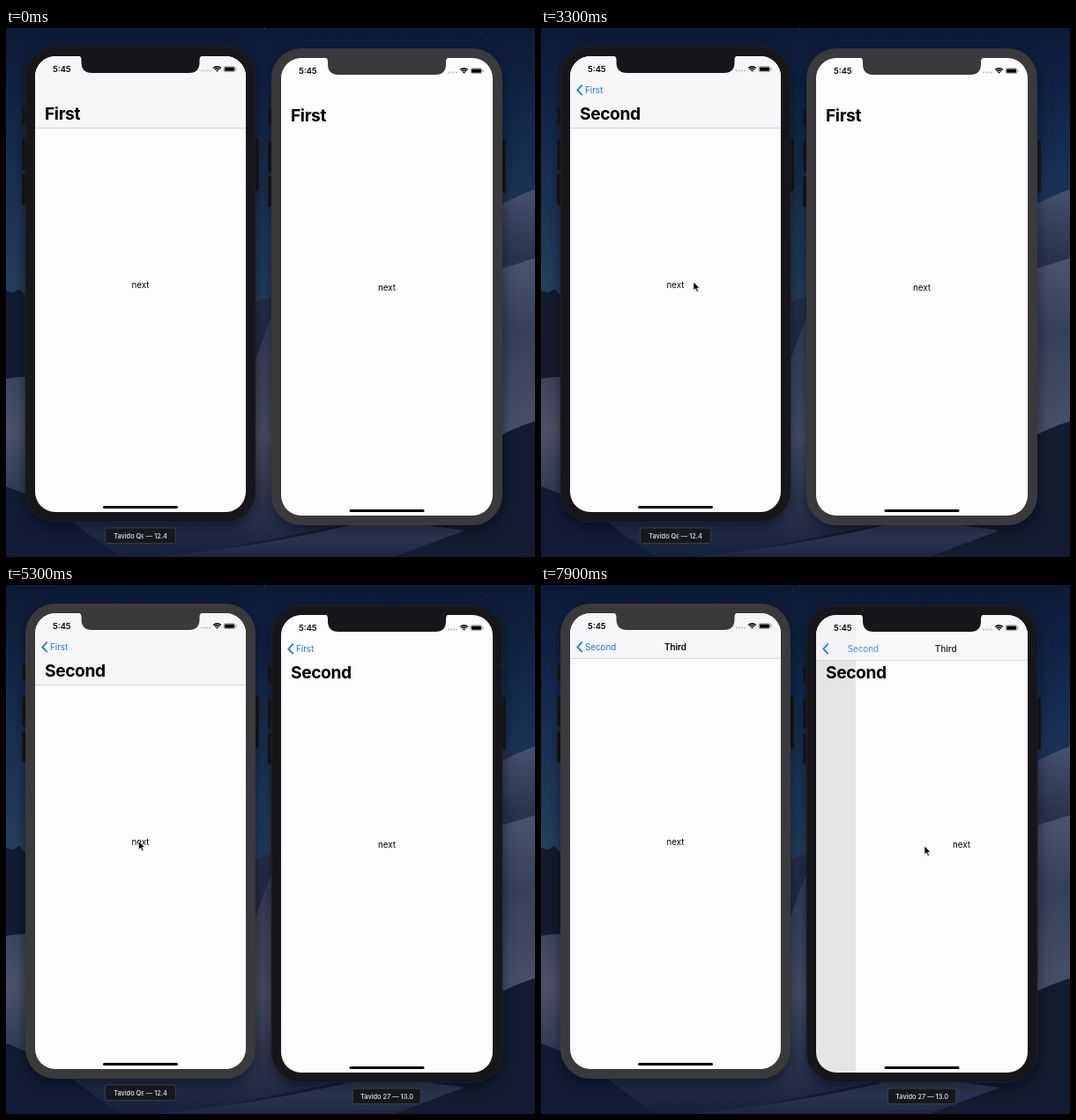
Write an HTML page that moves like this. It is 600 px wide and 600 px high and loops after 8 s.

```html
<!DOCTYPE html>
<html lang="en">
<head>
<meta charset="utf-8">
<title>Navigation push on two simulators</title>
<style>
  html, body { margin: 0; width: 100%; height: 100%; overflow: hidden; background: #0c1a34; }
  svg { display: block; width: 100vw; height: 100vh; }
  text { font-family: Inter, "Open Sans", sans-serif; white-space: pre; }
  .large { font-weight: 700; font-size: 19.2px; letter-spacing: -.4px; }
  .body { font-size: 9.8px; }
  .bold { font-size: 9.8px; font-weight: 600; }
  .clock { font-size: 9.3px; font-weight: 600; }
  .tag { font-size: 7.4px; font-weight: 500; fill: #e8e8ea; }
  .mid { text-anchor: middle; }
  .blue { fill: #1079ef; }
  .case { fill: #3a393b; filter: drop-shadow(0 5px 8px rgba(0, 0, 10, .5)); }
  .notch { fill: #3a393b; }
  .focused .case { fill: #17161a; stroke: #252529; stroke-width: .8; }
  .focused .notch { fill: #17161a; }
</style>
</head>
<body>
<svg viewBox="0 0 600 600" id="stage">
  <defs>
    <linearGradient id="sky" x2="0" y2="1">
      <stop offset="0" stop-color="#0c1a36"/>
      <stop offset=".2" stop-color="#142a4d"/>
      <stop offset=".5" stop-color="#24405f"/>
    </linearGradient>
    <linearGradient id="far" gradientUnits="userSpaceOnUse" x1="0" y1="180" x2="0" y2="460">
      <stop offset="0" stop-color="#46536f"/>
      <stop offset=".28" stop-color="#29344d"/>
      <stop offset="1" stop-color="#1d2740"/>
    </linearGradient>
    <linearGradient id="middle" gradientUnits="userSpaceOnUse" x1="0" y1="260" x2="0" y2="470">
      <stop offset="0" stop-color="#4a5570"/>
      <stop offset=".4" stop-color="#364059"/>
      <stop offset="1" stop-color="#4a5269"/>
    </linearGradient>
    <linearGradient id="near" gradientUnits="userSpaceOnUse" x1="0" y1="395" x2="0" y2="600">
      <stop offset="0" stop-color="#3d465e"/>
      <stop offset=".3" stop-color="#4b5369"/>
      <stop offset=".75" stop-color="#2a344d"/>
      <stop offset="1" stop-color="#16203a"/>
    </linearGradient>
    <linearGradient id="ridge" x2="0" y2="1">
      <stop offset="0" stop-color="#3b4660"/>
      <stop offset="1" stop-color="#1b2742"/>
    </linearGradient>
    <linearGradient id="edge">
      <stop offset="0" stop-color="#000" stop-opacity="0"/>
      <stop offset="1" stop-color="#000" stop-opacity=".12"/>
    </linearGradient>
  </defs>
  <rect width="600" height="600" fill="url(#sky)"/>
  <g id="stars" fill="#9fb2cf"></g>
  <path d="M0 298 8 300 15 296 25 306 70 330 300 350V600H0Z" fill="#131c30"/>
  <path d="M600 183C560 197 520 225 430 262S300 300 200 340V600H600Z" fill="url(#far)"/>
  <path d="M600 261C560 274 480 300 300 330L200 600H600Z" fill="url(#middle)"/>
  <path d="M0 398C60 385 200 430 300 470S480 600 600 600H0Z" fill="url(#near)"/>
  <path d="M600 446C540 465 480 510 400 560L200 600H600Z" fill="#131c31"/>
  <path d="M0 520C60 540 90 575 130 600H0Z" fill="#121c36"/>
  <path d="M170 600C270 590 350 575 420 556L520 570 440 600Z" fill="url(#ridge)"/>
  <g id="phones"></g>
  <circle id="ring" r="12" fill="none" stroke="#000" stroke-width="2"/>
  <path id="cursor" d="M0 0V9.6L2.2 7.6 3.8 11.2 5.4 10.5 3.8 7H6.8Z" stroke="#fff" stroke-width=".7"
        style="filter: drop-shadow(0 .7px .7px rgba(0,0,0,.35))"/>
</svg>
<script>
const LOOP = 8000, STEP = 100;
const PAGES = ['First', 'Second', 'Third'];
const $ = id => document.getElementById(id);
const lerp = (a, b, p) => a + (b - a) * p;
const fade = v => Math.max(0, Math.min(1, v)).toFixed(3);

const phones = [
  { x: 33, y: 32, w: 239, h: 517, pushes: [2500, 5700], delay: 60, solidBar: true, tagWidth: 80,
    tag: 'Tavido Q<tspan font-size="5.8">E</tspan> — 12.4' },
  { x: 312, y: 34, w: 240, h: 519, pushes: [4100, 7600], delay: 80, solidBar: false, tagWidth: 77,
    tag: 'Tavido 27 — 13.0' }
];
const clicks = phones.flatMap(p => p.pushes);

// time, x, y of the pointer tip
const route = [
  [100, 440, 572], [900, 186, 355], [1100, 186, 355], [1200, 171, 344], [1300, 180, 352],
  [1500, 180, 352], [2000, 163, 313], [2300, 173, 288], [3300, 173, 288], [4000, 435, 293],
  [4600, 435, 293], [5300, 150.5, 290.5], [6500, 150.5, 290.5], [7200, 435, 296], [LOOP, 435, 296]
];

function pointer(t) {
  const i = Math.max(1, route.findIndex(k => k[0] >= t));
  const [t0, x0, y0] = route[i - 1], [t1, x1, y1] = route[i];
  const u = Math.max(0, (t - t0) / (t1 - t0)), s = u * u * (3 - 2 * u);
  return [lerp(x0, x1, s), lerp(y0, y1, s)];
}

// critically damped spring
function spring(ms) {
  const k = Math.max(0, ms) * .014, p = 1 - (1 + k) * Math.exp(-k);
  return p > .995 ? 1 : p;
}

const text = (str, cls, x, y, opacity = 1, extra = '') =>
  `<text class="${cls}" x="${x}" y="${y}" opacity="${fade(opacity)}" ${extra}>${str}</text>`;
const rect = (x, y, w, h, fill, extra = '') =>
  `<rect x="${x}" y="${y}" width="${w}" height="${h}" fill="${fill}" ${extra}/>`;

function page({ w, h }, x) {
  return `<g transform="translate(${x})">${rect(0, 0, w, h, '#fefdfe')}${text('next', 'body mid', w / 2, h / 2 + 4)}</g>`;
}

function chevron(opacity) {
  return `<path d="M13.7 32.6 8.3 38.4 13.7 44.2" fill="none" stroke="#1079ef" stroke-width="1.7" opacity="${fade(opacity)}"/>`;
}

function navBar(phone, from, to, p) {
  const { w, solidBar } = phone, rest = 1 - p;
  const barHeight = i => solidBar && i < 2 ? 81 : 51;
  const height = lerp(barHeight(from), barHeight(to), p);
  const shown = solidBar ? 1 : to === 2 ? p : 0;
  let out = `<g opacity="${fade(shown)}">${rect(0, 0, w, height, '#f6f5f7')}${rect(0, height, w, .8, '#cfced2')}</g>`;

  if (to === 2) out += text('Third', 'bold mid', w / 2 + 145 * rest, 42, p);
  else out += text(PAGES[to], 'large', 11 + (to ? w * rest : 0), 72);
  if (!to) return out;

  const old = PAGES[from];
  out += chevron(from ? 1 : p);
  if (from) out += text(PAGES[from - 1], 'body blue', 17 - 40 * p, 42, 1 - 2.5 * p);
  if (solidBar) {
    const x = lerp(11, 17, p), y = lerp(72, 42, p), size = `style="font-size:${lerp(19.2, 9.8, p)}px"`;
    out += text(old, 'large', x, y, 1 - 1.6 * p, size) + text(old, 'body blue', x, y, p * 1.2, size);
  } else {
    out += text(old, 'body blue', 17 + 100 * rest, 42, p);
    if (p < 1) out += text(old, 'large', to === 2 ? 11 : 11 - w * p, 72, to === 2 ? 1 : 1 - p);
  }
  return out;
}

function screen(phone, t) {
  const { w, h, pushes, delay, solidBar } = phone;
  const to = pushes.filter(at => t >= at).length, from = Math.max(0, to - 1);
  const p = to ? spring(t - pushes[to - 1] - delay) : 1;
  let out = '';
  if (p < 1) {
    const x = w * (1 - p);
    out += page(phone, -.3 * w * p) + rect(0, 0, w, h, '#000', `opacity="${.115 * p}"`);
    if (solidBar) out += rect(x - 5, 0, 5, h, 'url(#edge)');
  }
  return out + page(phone, w * (1 - p)) + navBar(phone, from, to, p);
}

function statusBar(w) {
  const dots = [0, 1, 2, 3].map(i => `<circle cx="${w - 50 + i * 3}" cy="16.6" r="1" fill="#bbb"/>`).join('');
  const arc = r => `<path d="M${-r * .72} ${-r * .72}A${r} ${r} 0 0 1 ${r * .72} ${-r * .72}" fill="none" stroke="#000" stroke-width="1.5"/>`;
  return text('5:45', 'clock', 20, 17.8) + dots +
    `<g transform="translate(${w - 32.5} 17.8)">${arc(6)}${arc(3.7)}<path d="M0 0-1.4-1.6A2 2 0 0 1 1.4-1.6Z"/></g>` +
    rect(w - 25, 11.6, 13, 6, 'none', 'rx="1.7" stroke="#777" stroke-width=".6"') +
    rect(w - 24.1, 12.5, 11.2, 4.2, '#000', 'rx=".9"') + rect(w - 11.4, 13.5, .9, 2.2, '#777', 'rx=".4"');
}

function shell({ x, y, w, h, tag, tagWidth }, i) {
  const button = (bx, by, bh) => rect(bx, by, 6, bh, '#15171c', 'rx="1.2" stroke="#2b2e35" stroke-width=".6"');
  const left = w / 2 - 67, right = w / 2 + 67;
  return `<g id="phone${i}" transform="translate(${x} ${y})">
    <clipPath id="clip${i}"><rect width="${w}" height="${h}" rx="23"/></clipPath>
    ${button(-15, 58, 19)}${button(-15, 94, 35)}${button(-15, 134, 35)}${button(w + 9, 93, 60)}
    <rect class="case" x="-11" y="-11" width="${w + 22}" height="${h + 22}" rx="34"/>
    <g clip-path="url(#clip${i})"><g id="screen${i}"></g></g>
    ${statusBar(w)}
    <path class="notch" d="M${left - 4}-.6Q${left} -.4 ${left} 4V7Q${left} 19 ${left + 12} 19H${right - 12}Q${right} 19 ${right} 7V4Q${right} -.4 ${right + 4}-.6Z"/>
    ${rect(w / 2 - 42.5, h - 7, 85, 3, '#000', 'rx="1.5"')}
    <g id="tag${i}">${rect((w - tagWidth) / 2, h + 18, tagWidth, 17.5, '#17181c', 'rx="2.5" stroke="#43454b" stroke-width=".8"')}
      ${text(tag, 'tag mid', w / 2, h + 29.6)}</g>
  </g>`;
}

function render(t) {
  const [x, y] = pointer(t), pointing = t >= 100;
  const focus = t < 4100 ? 0 : t < 5700 ? 1 : t < 7600 ? 0 : 1;
  const hover = !pointing ? -1 : x > 292 ? 1 : 0;
  phones.forEach((phone, i) => {
    $('screen' + i).innerHTML = screen(phone, t);
    $('phone' + i).classList.toggle('focused', focus === i);
    $('tag' + i).setAttribute('visibility', focus === i || hover === i ? 'visible' : 'hidden');
  });
  $('cursor').setAttribute('transform', `translate(${x} ${y})`);
  $('cursor').setAttribute('visibility', pointing ? 'visible' : 'hidden');
  $('ring').setAttribute('transform', `translate(${x + .5} ${y + 1})`);
  $('ring').setAttribute('visibility', clicks.includes(t) ? 'visible' : 'hidden');
}

let seed = 7;
const random = () => (seed = seed * 16807 % 2147483647) / 2147483647;
$('stars').innerHTML = Array.from({ length: 60 }, () =>
  `<circle cx="${random() * 600}" cy="${random() * 230}" r=".5" opacity="${.2 + random() * .4}"/>`).join('');
$('phones').innerHTML = phones.map(shell).join('');

let shown = -1;
const start = performance.now();
function tick(now) {
  const t = Math.floor(Math.max(0, now - start) % LOOP / STEP) * STEP;
  if (t !== shown) render(shown = t);
  requestAnimationFrame(tick);
}
render(0);
requestAnimationFrame(tick);
</script>
</body>
</html>
```
